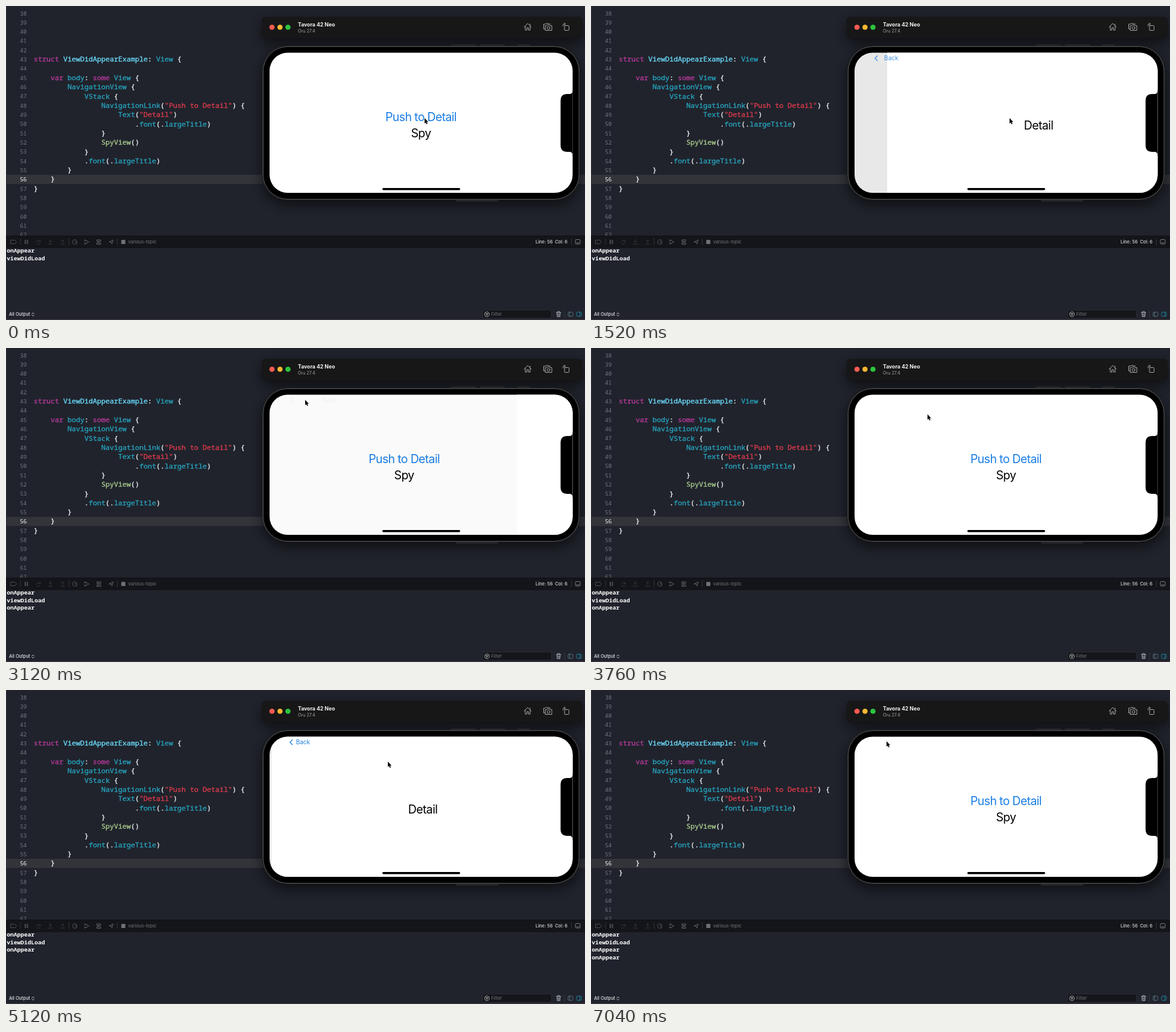
Animation, 960 px wide and 521 px high, one loop 7.12 s. Source, as an HTML page:

```html
<!DOCTYPE html>
<html lang="en">
<head>
<meta charset="utf-8">
<style>
html, body { margin: 0; width: 100%; height: 100%; overflow: hidden; background: #20232c; }
svg { display: block; width: 960px; height: 521px; }
text { font-family: Inter, Roboto, sans-serif; font-optical-sizing: none; white-space: pre; }
.code, .num, .log { font-family: "Noto Sans Mono", "DejaVu Sans Mono", monospace; }
.code { font-size: 11.667px; fill: currentColor; stroke: currentColor; stroke-width: .35px; }
.num { font-size: 9.4px; fill: #727681; text-anchor: end; }
.log { font-size: 9.6px; font-weight: 700; fill: #fff; }
.big { font-size: 19.5px; letter-spacing: -.65px; text-anchor: middle; }
.icon { fill: none; stroke: #4b4d53; stroke-linecap: round; stroke-linejoin: round; }
</style>
</head>
<body>
<svg viewBox="0 0 960 521">
  <defs>
    <clipPath id="glass"><rect x="437" y="77.5" width="502.500" height="232.5" rx="30"/></clipPath>
    <clipPath id="editorClip"><rect width="960" height="381"/></clipPath>
    <filter id="shadow" x="-15%" y="-80%" width="130%" height="300%">
      <feDropShadow dx="0" dy="8" stdDeviation="11" flood-color="#000" flood-opacity=".6"/>
    </filter>
  </defs>

  <!-- editor -->
  <rect width="960" height="521" fill="#20232c"/>
  <rect width="1" height="381" fill="#30333b"/>
  <rect x="1" y="280" width="959" height="15.3" fill="#32343a"/>
  <g id="editor" clip-path="url(#editorClip)"></g>

  <!-- device shadows -->
  <rect x="424" y="18" width="532" height="35" rx="8" filter="url(#shadow)"/>
  <rect x="425" y="66" width="526.500" height="256" rx="42" filter="url(#shadow)"/>

  <!-- debug bar -->
  <rect y="381.5" width="960" height="19.5" fill="#14151a"/>
  <path d="M0 381.5H960M0 401H960" stroke="#0f1013"/>
  <g class="icon">
    <path d="M8 388.5h7l2.5 3-2.5 3H8z"/>
    <path d="M32 388v7M35.500 388v7" stroke-width="2" stroke-linecap="butt"/>
    <path d="M50 392q3-5 7-1l-2 0M57 391v-2M51 395h5M73.500 387v5m-2-2 2 2 2-2M70 395h7M94 393v-5m-2 2 2-2 2 2M90.500 395h7" stroke="#35373d"/>
    <path d="M111 389l3-1.500 3 1.500v5l-3 1.500-3-1.500zM114 391h3v4"/>
    <path d="M131 389h3l2 2.500h2M131 394h3l2-2.500" stroke="#606268"/>
    <circle cx="131" cy="389" r="1.2"/><circle cx="131" cy="394" r="1.2"/>
    <path d="M151 388h6v2.500h-6zM151 393h6v2.500h-6zM153 390v3" stroke="#606268"/>
    <path d="M171 391.500l7-3.500-2.500 7-1-3z" stroke="#606268"/>
    <path d="M24 386v10M104.500 386v10M184.500 386v10M937.500 386v10" stroke="#33353a"/>
    <rect x="944" y="387.5" width="8" height="7.500" rx="1.500" stroke="#77797e"/><path d="M945.500 393h5" stroke="#77797e"/>
  </g>
  <rect x="191" y="388" width="7" height="7" rx="1.500" fill="#6d6f75"/>
  <text x="202.500" y="394" font-size="7.5" fill="#74767b">various-topic</text>
  <text x="931" y="394" font-size="7.4" font-weight="600" fill="#bdbec1" text-anchor="end">Line: 56  Col: 6</text>

  <!-- console -->
  <g id="console"></g>
  <text x="5" y="514.3" font-size="7.4" font-weight="500" fill="#e2e2e4">All Output</text>
  <path d="M43 510.800l1.700-1.800 1.700 1.800M43 512.800l1.700 1.800 1.700-1.800" class="icon" style="stroke:#ccc"/>
  <rect x="790.500" y="504.500" width="114" height="13.500" rx="3" fill="#14161a" stroke="#2a2c33"/>
  <g class="icon" style="stroke:#a5a7ab">
    <circle cx="797.500" cy="511.500" r="4"/>
    <path d="M795.500 510.300h4M796.300 511.800h2.400M797 513.300h1"/>
    <path d="M912.500 508.500h7.500M914.500 508v-1h3.500v1M913.500 509l.5 6.500h4.500l.5-6.500M915.300 510.500v3.500M917.200 510.500v3.500"/>
    <rect x="932" y="508" width="8" height="7" rx="1.500" stroke="#55707c"/><path d="M934.500 508v7" stroke="#55707c"/>
    <rect x="946" y="508" width="8" height="7" rx="1.500" stroke="#1e819b"/><path d="M951.500 508v7" stroke="#1e819b"/>
    <path d="M926 506v11" stroke="#353840"/>
  </g>
  <text x="804.500" y="514.2" font-size="7.4" fill="#73757b">Filter</text>
  <rect y="520" width="960" height="1" fill="#423b48"/>

  <!-- device window bar -->
  <rect x="424" y="18" width="532" height="35" rx="8" fill="#171718"/>
  <circle cx="441" cy="35.200" r="4.300" fill="#fe5b52"/>
  <circle cx="454.300" cy="35.200" r="4.300" fill="#f9b932"/>
  <circle cx="467.500" cy="35.200" r="4.300" fill="#2dc43f"/>
  <text x="484" y="34" font-size="8.7" font-weight="700" fill="#f2f2f2">Tavora 42 Neo</text>
  <text x="484" y="44" font-size="7.2" fill="#a5a5a7">Oru 27.4</text>
  <g class="icon" style="stroke:#aaaaac">
    <path d="M859 35l6-6 6 6M861 33.500v6.500h2.700v-4h2.600v4h2.700v-6.500M869 30v2"/>
    <path d="M893.500 38h-2v-8h3l1-1h4l1 1h2"/>
    <path d="M894.500 32.500h2l1-1.200h3.500l1 1.200h3v8h-10.500z"/><circle cx="899.500" cy="36.300" r="2.300"/>
    <rect x="926" y="32.500" width="7.500" height="8" rx="1"/><path d="M923.500 33v-1.500q0-1.500 1.500-1.500h2M925.500 28l2 2-2 2"/>
  </g>

  <!-- phone -->
  <path d="M738 65.500h41M786 65.500h41M848 65.500h20M746 323h70" stroke="#28292c" stroke-width="3"/>
  <rect x="425" y="66" width="526.500" height="256" rx="42" fill="#2a2b2d"/>
  <rect x="426.500" y="67.500" width="523.500" height="253" rx="40.500" fill="#000" stroke="#505154"/>
  <g clip-path="url(#glass)">
    <rect x="437" y="77" width="503" height="234" fill="#fff"/>
    <g id="home">
      <text class="big" id="link" x="688" y="191" fill="#1a7de4">Push to Detail</text>
      <text class="big" x="688" y="218.300">Spy</text>
    </g>
    <rect id="dim" x="437" y="77" width="503" height="234"/>
    <g id="detail">
      <rect x="437" y="77" width="503" height="234" fill="#fff"/>
      <text class="big" x="688" y="204.500">Detail</text>
    </g>
    <g id="nav" fill="#1f7fe2">
      <path d="M474.800 82.800l-3.900 4 3.900 4" fill="none" stroke="#1f7fe2" stroke-width="1.300" stroke-linecap="round"/>
      <text id="back" x="480.300" y="90.300" font-size="10">Back</text>
    </g>
    <rect x="624" y="302" width="129" height="3.500" rx="1.700"/>
    <path d="M941 139H939.500C939.500 146 936 146 933 146h-2.500q-11 0-11 11v74q0 11 11 11h2.500C936 242 939.500 242 939.500 249h1.500z"/>
  </g>
  <circle id="ring" fill="none" stroke="#7fa9dc"/>
  <path id="cursor" d="M0 0V9L2 7.200 3.400 10.300 4.900 9.600 3.500 6.600H6.200Z" stroke="#fff" stroke-width=".7" paint-order="stroke"/>
</svg>
<script>
const LOOP = 7120, STEP = 80, WIDTH = 503;
const $ = id => document.getElementById(id);

const source = `struct ViewDidAppearExample: View {

    var body: some View {
        NavigationView {
            VStack {
                NavigationLink("Push to Detail") {
                    Text("Detail")
                        .font(.largeTitle)
                }
                SpyView()
            }
            .font(.largeTitle)
        }
    }
}`.split('\n');

function tokenColor(word) {
  if (/^(struct|var|some)$/.test(word)) return '#b83a9c';
  if (word === 'ViewDidAppearExample') return '#6bdcfb';
  if (word === 'SpyView') return '#a9cb8d';
  if (word[0] === '"') return '#dd3b4c';
  return /\w/.test(word) ? '#27a3bd' : '#f0f0f2';
}

let rows = '';
for (let n = 38; n <= 62; n++) {
  const y = 15.7 + (n - 38) * 15.32;
  const color = n === 56 ? ' style="fill:#fff"' : '';
  rows += `<text class="num" x="34.500" y="${y - .2}"${color}>${n}</text>`;
  for (const m of (source[n - 43] || '').matchAll(/"[^"]*"|\w+|[^\w\s"]+/g))
    rows += `<text class="code" x="${46 + 7 * m.index}" y="${y}" color="${tokenColor(m[0])}">${m[0]}</text>`;
}
$('editor').innerHTML = rows;

const logs = [['onAppear', 0], ['viewDidLoad', 0], ['onAppear', 3040], ['onAppear', 6160]];
$('console').innerHTML = logs.map(([word], i) =>
  `<text class="log" x="1.300" y="${409 + i * 12.65}">${word}</text>`).join('');

const clicks = [1120, 2800, 4640, 5920];
const pushes = [1330, 4760], pops = [2965, 6085];

// start, duration, then three points of a quadratic curve
const moves = [
  [1900, 660, 694, 186, 575, 103, 496, 86],
  [3500, 700, 496, 86, 600, 120, 674.5, 183],
  [4900, 550, 674.5, 183, 634, 69, 490, 85]
];

const clamp = v => Math.max(0, Math.min(1, v));
const smooth = v => v * v * (3 - 2 * v);
const spring = ms => ms < 0 ? 0 : 1 - (1 + ms / 50) * Math.exp(-ms / 50);
const last = (times, t) => times.filter(s => s <= t).pop() ?? -1e6;

function cursorAt(t) {
  const [start, length, ax, ay, bx, by, cx, cy] = moves.filter(m => m[0] <= t).pop() || moves[0];
  const u = smooth(clamp((t - start) / length)), v = 1 - u;
  const mix = (a, b, c) => v * v * a + 2 * u * v * b + u * u * c;
  return [mix(ax, bx, cx), mix(ay, by, cy)];
}

function draw(t) {
  const push = last(pushes, t), pop = last(pops, t);
  const away = push > pop ? 1 - spring(t - push) : pop > 0 ? spring(t - pop) : 1;
  const shown = 1 - away;
  const shift = (id, x, y = 0) => $(id).setAttribute('transform', `translate(${x} ${y})`);
  shift('home', -.3 * WIDTH * shown);
  shift('detail', WIDTH * away);
  shift('back', 54 * away);
  $('dim').setAttribute('opacity', .1 * shown);
  $('nav').setAttribute('opacity', shown ** 1.6);

  const click = last(clicks, t), age = t - click;
  const onLink = click === clicks[0] || click === clicks[2];
  const pressed = onLink && push < click;
  const recover = push > pop ? clamp((t - push) / 300) : 1;
  $('link').setAttribute('opacity', pressed ? .2 : .2 + .8 * recover);

  const [x, y] = cursorAt(t);
  shift('cursor', x, y);
  const ring = $('ring'), grow = clamp(age / 320);
  ring.setAttribute('cx', x - .5);
  ring.setAttribute('cy', y);
  ring.setAttribute('r', 10 + 20 * grow * (1.1 - .1 * grow));
  ring.setAttribute('stroke-width', 2.6 - 2.6 * grow);
  ring.setAttribute('opacity', grow < 1 ? 1 : 0);

  logs.forEach(([, at], i) => $('console').children[i].setAttribute('opacity', t >= at ? 1 : 0));
}

const begin = performance.now();
function frame() {
  const t = (performance.now() - begin) % LOOP;
  draw(Math.floor(t / STEP) * STEP);
  requestAnimationFrame(frame);
}
frame();
</script>
</body>
</html>
```
